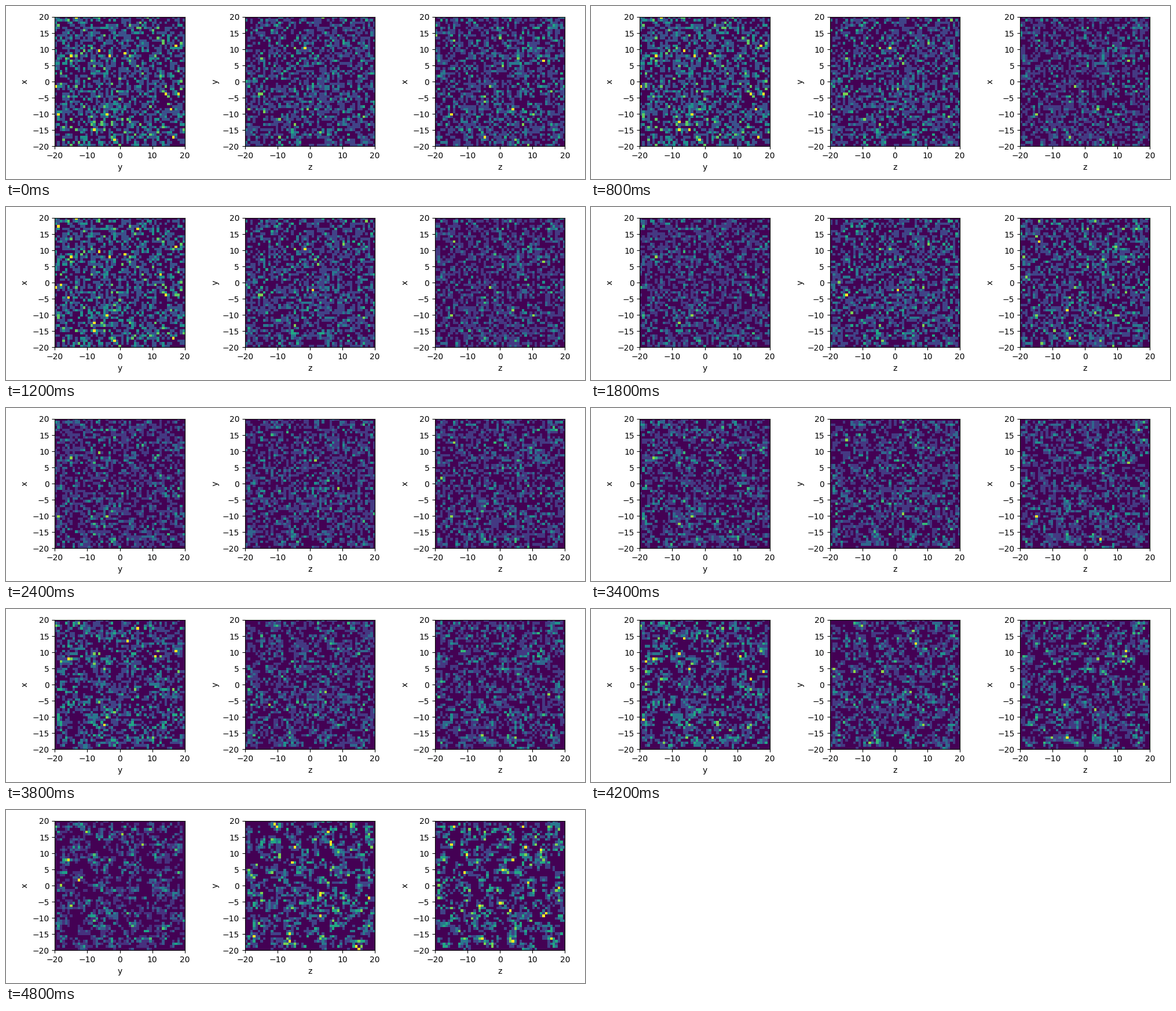
Recreate the animation shown at these times as a matplotlib script. Size 1000 by 300 pixels, loop 5000 ms.

```python
import numpy as np
import matplotlib.pyplot as plt
from matplotlib.animation import FuncAnimation

FRAMES, STEP = 25, 200
HALF, BINS = 20, 51
COUNT, CLUMPS = 1850, 400
X, Y, Z = range(3)

# (horizontal axis, vertical axis, {first frame: top of the colour scale})
PANELS = [
    (Y, X, {0: 4, 7: 6, 19: 5, 23: 7}),
    (Z, Y, {0: 5, 11: 6, 23: 5}),
    (Z, X, {0: 5, 3: 6, 7: 5, 11: 6, 23: 5}),
]

rng = np.random.default_rng(11)
start = rng.uniform(-HALF, HALF, (COUNT, 3))
centres = rng.uniform(-HALF, HALF, (CLUMPS, 3))

# Every particle falls from rest towards its nearest clump.
dist = np.linalg.norm(start[:, None] - centres, axis=2)
fall = 0.65 * (centres[dist.argmin(axis=1)] - start)


def positions(i):
    return start + fall * (i / (FRAMES - 1)) ** 2


def density(pts, h, v):
    edges = np.linspace(-HALF, HALF, BINS + 1)
    return np.histogram2d(pts[:, v], pts[:, h], bins=[edges, edges])[0]


fig, axes = plt.subplots(1, 3, figsize=(10, 3), dpi=100, facecolor="white")
images = []
for ax, (h, v, _) in zip(axes, PANELS):
    images.append(ax.imshow(
        np.zeros((BINS, BINS)), cmap="viridis", origin="lower",
        interpolation="nearest", extent=(-HALF, HALF, -HALF, HALF)))
    ax.set_xticks(range(-HALF, HALF + 1, 10))
    ax.set_yticks(range(-HALF, HALF + 1, 5))
    ax.set_xlabel("xyz"[h])
    ax.set_ylabel("xyz"[v])
fig.tight_layout()


def draw(i):
    pts = positions(i)
    for im, (h, v, tops) in zip(images, PANELS):
        im.set_data(density(pts, h, v))
        im.set_clim(0, tops[max(k for k in tops if k <= i)])
    return images


anim = FuncAnimation(fig, draw, frames=FRAMES, interval=STEP,
                     repeat=True, repeat_delay=0, blit=False)
plt.show()
```
